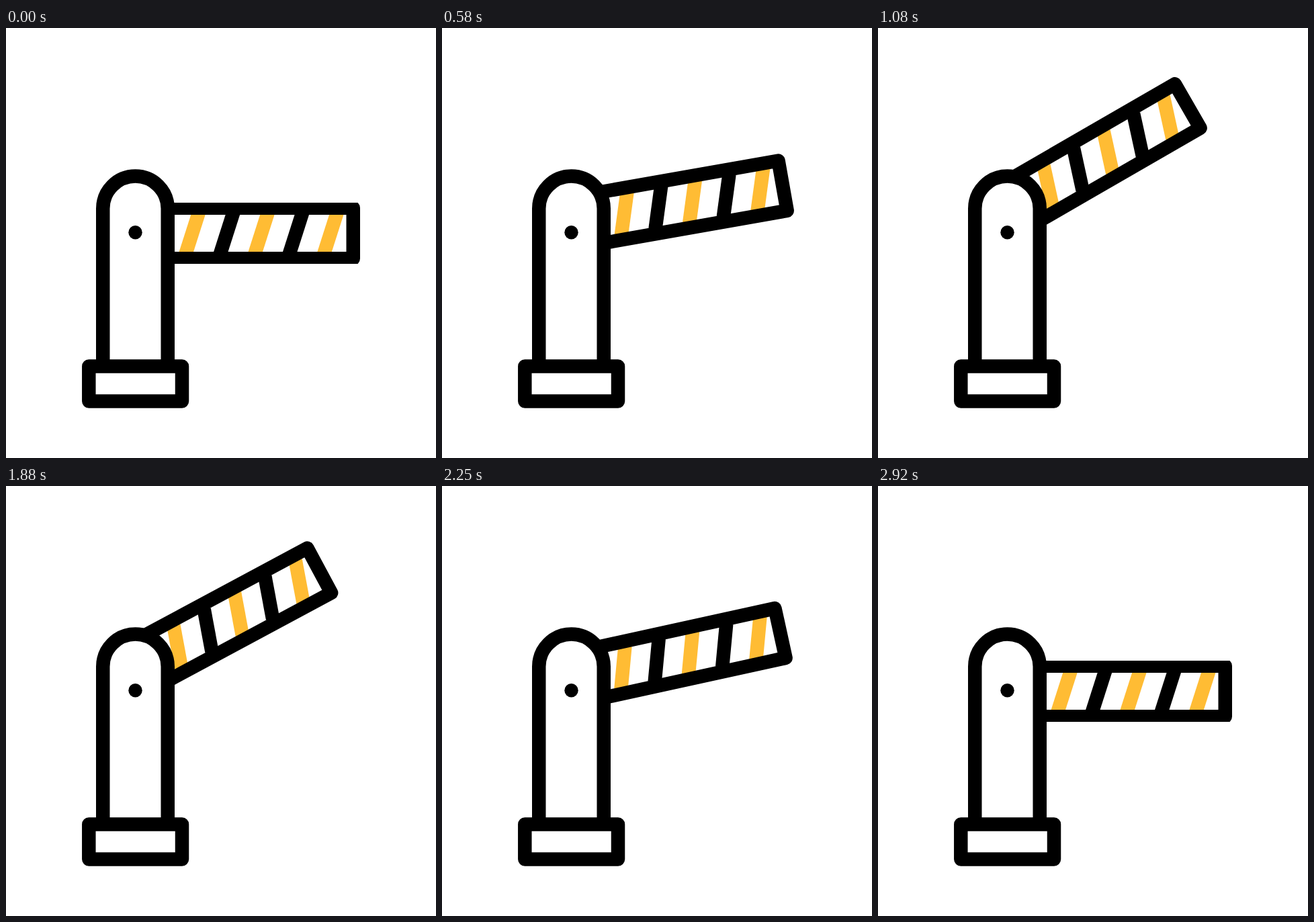
An HTML page that plays this animation: 640 by 640 pixels, repeating every 3 s.

```html
<!DOCTYPE html>
<html lang="en">
<head>
<meta charset="utf-8">
<title>Barrier gate</title>
<style>
  html, body { margin: 0; width: 100%; height: 100%; overflow: hidden; background: #fff; }
  svg { display: block; width: 100%; height: 100%; }
</style>
</head>
<body>
<svg viewBox="0 0 640 640" fill="none" stroke="#000" stroke-width="20.5" stroke-linejoin="round">
  <clipPath id="level"><rect x="180" y="260" width="360" height="91"/></clipPath>
  <g id="arm">
    <g id="bar">
      <g id="stripes"></g>
      <path d="M210 267.75H516.75V343.25H210"/>
    </g>
  </g>
  <path fill="#fff" d="M144.25 503V268.8a48.25 48.25 0 0 1 96.5 0V503"/>
  <rect fill="#fff" x="123.3" y="503.4" width="138.7" height="52.2"/>
  <circle cx="192.5" cy="304.2" r="10.2" fill="#000" stroke="none"/>
</svg>
<script>
  const LOOP = 3000, FPS = 24;
  const OPEN_ANGLE = 30;
  const PIVOT = { x: 185.45, y: 322.2 };
  const LIFT = { x: -3.25, y: -26 };

  const arm = document.getElementById('arm');
  const bar = document.getElementById('bar');
  const stripes = document.getElementById('stripes');

  // Slanted stripes alternate yellow and black; yellow goes underneath.
  for (const [first, color] of [[0, '#ffbc34'], [1, '#000']]) {
    for (let i = first; i < 5; i += 2) {
      const stripe = document.createElementNS('http://www.w3.org/2000/svg', 'path');
      stripe.setAttribute('d', `M${286.9 + i * 51.45} 275l-19.5 61`);
      stripe.setAttribute('stroke', color);
      stripes.append(stripe);
    }
  }

  const ramp = (value, from, to) => Math.min(1, Math.max(0, (value - from) / (to - from)));

  function render(ms) {
    const step = Math.floor((ms % LOOP + 4) * FPS / 1000);
    const lift = ramp(step, 1, 26) - ramp(step, 44, 70);
    const angle = OPEN_ANGLE * (ramp(step, 8, 26) - ramp(step, 44, 61));
    arm.setAttribute('transform',
      `translate(${LIFT.x * lift} ${LIFT.y * lift}) rotate(${-angle} ${PIVOT.x} ${PIVOT.y})`);
    // The level arm has trimmed long edges.
    if (angle === 0) bar.setAttribute('clip-path', 'url(#level)');
    else bar.removeAttribute('clip-path');
  }

  const start = performance.now();
  function tick() {
    render(performance.now() - start);
    requestAnimationFrame(tick);
  }
  tick();
</script>
</body>
</html>
```
